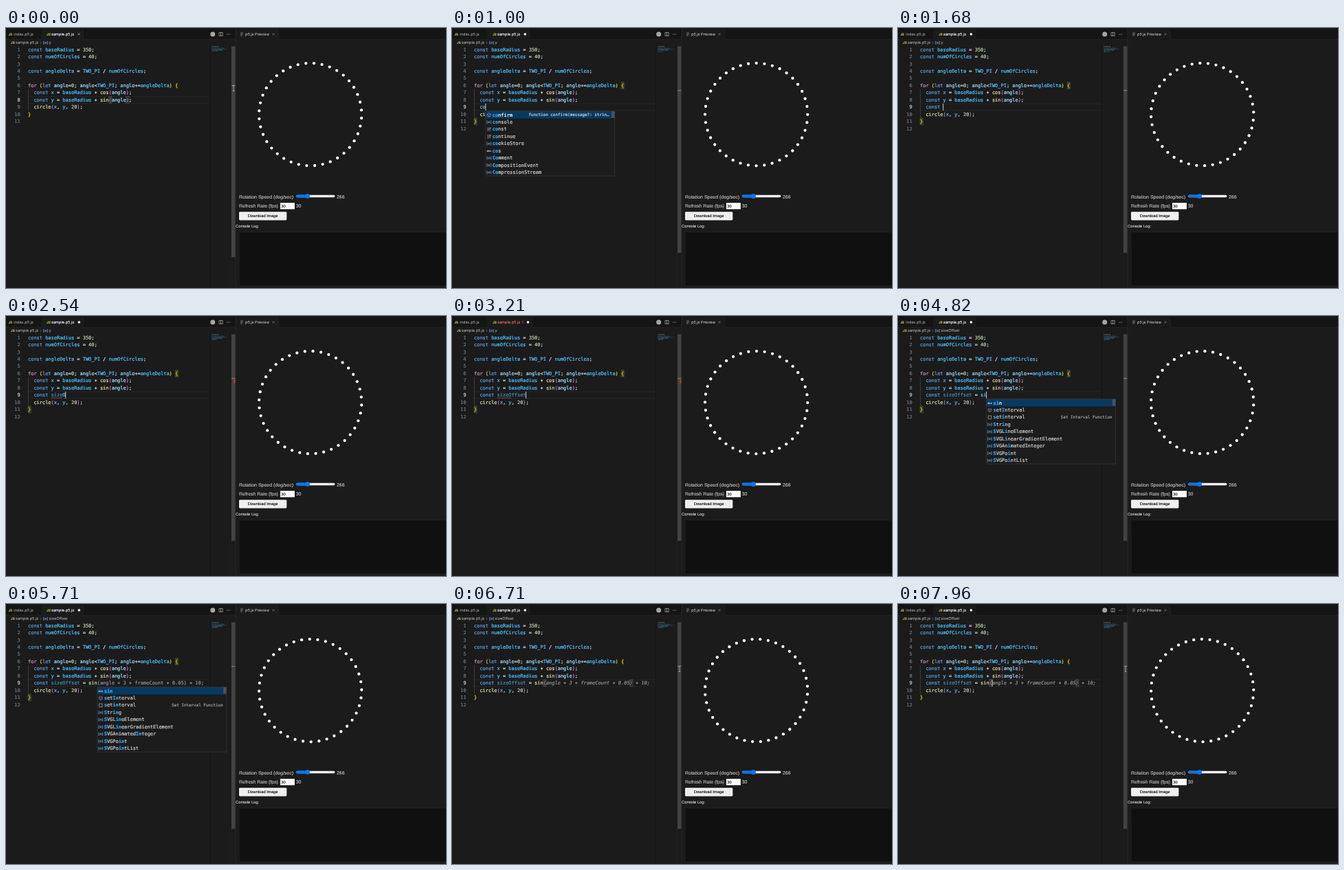
These frames come from a looping animation (640 px wide and 378 px high, 8000 ms). An HTML page with a canvas:

```html
<!DOCTYPE html>
<html lang="en">
<head>
<meta charset="utf-8">
<title>p5.js live coding</title>
<style>
  html, body { margin: 0; width: 100%; height: 100%; overflow: hidden; background: #1b1b1b; }
  canvas { display: block; width: 640px; height: 378px; }
</style>
</head>
<body>
<canvas id="stage"></canvas>
<script>
const W = 640, H = 378, LOOP = 8000;
const canvas = document.getElementById('stage');
const ctx = canvas.getContext('2d');
const dpr = window.devicePixelRatio || 1;
canvas.width = W * dpr;
canvas.height = H * dpr;

const CODE = '6.97px "DejaVu Sans Mono", monospace';
const DETAIL = '5.92px "DejaVu Sans Mono", monospace';
const UI = '5.6px Inter, sans-serif';
const CW = 4.196, LH = 10.45, LEFT = 32, TOP = 31.3;
const BG = '#1b1b1b', BAR = '#151515', BORDER = '#292929';

const HEAD = [
  'const baseRadius = 350;',
  'const numOfCircles = 40;',
  '',
  'const angleDelta = TWO_PI / numOfCircles;',
  '',
  'for (let angle=0; angle<TWO_PI; angle+=angleDelta) {',
  '  const x = baseRadius * cos(angle);',
  '  const y = baseRadius * sin(angle);'
];
const TAIL = ['  circle(x, y, 20);', '}', ''];

const ENTER = 420;
const TYPED = 'const sizeOffset = sin(';
const KEYS = [780, 900, 1080, 1200, 1320, 1480, 1700, 1820, 1980, 2260, 2500, 2640,
  2760, 2900, 3020, 3160, 3440, 4150, 4290, 4600, 4760, 4970, 5750];
const NAME_COL = 6, NAME_LEN = 10;

// Popup entries: icon letter, then label.
const C_ITEMS = ['f confirm', 'v console', 'k const', 'k continue', 'v cookieStore',
  'a cos', 'v Comment', 'v CompositionEvent', 'v CompressionStream'];
const S_ITEMS = ['a sin', 'f setInterval', 's setinterval', 'v String', 'v SVGLineElement',
  'v SVGLinearGradientElement', 'v SVGAnimatedInteger', 'v SVGPoint', 'v SVGPointList'];
const CON_ITEMS = ['k const', 'f confirm', 'v console', 'k continue', 'v ConstantSourceNode',
  'v ConvolverNode', 'v CountQueuingStrategy', 'v constructor', 'v contentEditable'];

const COLORS = {
  keyword: '#569cd6', control: '#c990c6', constant: '#4fc1ff', variable: '#9cdcfe',
  call: '#dcdcaa', number: '#b5cea8', plain: '#d4d4d4'
};

function rect(x, y, w, h, color) {
  ctx.fillStyle = color;
  ctx.fillRect(x, y, w, h);
}

function frame(x, y, w, h, color, width = 0.5) {
  ctx.strokeStyle = color;
  ctx.lineWidth = width;
  ctx.strokeRect(x, y, w, h);
}

function disc(x, y, r, color) {
  ctx.fillStyle = color;
  ctx.beginPath();
  ctx.arc(x, y, r, 0, Math.PI * 2);
  ctx.fill();
}

function pill(x, y, w, h, r, color) {
  ctx.fillStyle = color;
  ctx.beginPath();
  ctx.roundRect(x, y, w, h, r);
  ctx.fill();
}

function path(points, color, width = 0.6) {
  ctx.strokeStyle = color;
  ctx.lineWidth = width;
  ctx.beginPath();
  points.forEach(([x, y], i) => i ? ctx.lineTo(x, y) : ctx.moveTo(x, y));
  ctx.stroke();
}

// A hairline outline gives small type a slightly fuller weight.
function text(str, x, y, color, font = UI, align = 'left', weight = 0.1) {
  ctx.font = font;
  ctx.fillStyle = ctx.strokeStyle = color;
  ctx.textAlign = align;
  ctx.lineWidth = weight;
  ctx.fillText(str, x, y);
  ctx.strokeText(str, x, y);
}

function code(str, x, y, color, font = CODE, align = 'left') {
  // The operator form of the asterisk sits on the middle of the line.
  text(String(str).replaceAll('*', '∗'), x, y + 0.5, color, font, align, 0.24);
}

function cross(x, y, color) {
  const r = 1.6;
  path([[x - r, y - r], [x + r, y + r]], color);
  path([[x + r, y - r], [x - r, y + r]], color);
}

const lineY = n => TOP + (n - 1) * LH;
const colX = c => LEFT + c * CW;

function tokenColor(word) {
  if (/^(const|let)$/.test(word)) return COLORS.keyword;
  if (word === 'for') return COLORS.control;
  if (/^(cos|sin|circle|random)$/.test(word)) return COLORS.call;
  if (word === 'angle') return COLORS.variable;
  if (/^\d/.test(word)) return COLORS.number;
  if (/^[a-z_]/i.test(word)) return COLORS.constant;
  if (/[{}]/.test(word)) return '#ffd700';
  return COLORS.plain;
}

function codeLine(str, n, dim) {
  const paren = str.startsWith('  ') ? '#da70d6' : '#ffd700';
  for (const m of str.matchAll(/[A-Za-z_]\w*|\d+|[^\s]/g)) {
    const word = m[0];
    const color = /[()]/.test(word) ? paren : tokenColor(word);
    const faded = m.index === NAME_COL + 2 ? dim : 0;
    if (faded) {
      ctx.globalAlpha = 0.62;
      code(word.slice(0, faded), colX(m.index), lineY(n), color);
      ctx.globalAlpha = 1;
    }
    code(word.slice(faded), colX(m.index + faded), lineY(n), color);
  }
}

function bracketBox(col, n) {
  rect(colX(col), lineY(n) - 4.9, CW, 9.8, 'rgba(0,100,0,0.2)');
  frame(colX(col) + 0.2, lineY(n) - 4.9, CW - 0.2, 9.8, '#808080', 0.45);
}

function symbolIcon(kind, x, y) {
  const blue = '#75beff', purple = '#b180d7', grey = '#cccccc';
  if (kind === 'v') {
    path([[x - 2, y - 2], [x - 3, y - 2], [x - 3, y + 2], [x - 2, y + 2]], blue);
    path([[x + 2, y - 2], [x + 3, y - 2], [x + 3, y + 2], [x + 2, y + 2]], blue);
    frame(x - 1.2, y - 0.9, 2.4, 1.8, blue, 0.6);
  } else if (kind === 'f') {
    path([[x, y - 2.8], [x + 2.5, y - 1.4], [x + 2.5, y + 1.4], [x, y + 2.8],
      [x - 2.5, y + 1.4], [x - 2.5, y - 1.4], [x, y - 2.8]], purple);
    path([[x - 2.5, y - 1.4], [x, y], [x + 2.5, y - 1.4]], purple);
    path([[x, y], [x, y + 2.8]], purple);
  } else if (kind === 'k') {
    for (let i = -1; i < 2; i++) {
      path([[x - 2.6, y + i * 1.9], [x + (i ? 0 : 2.6), y + i * 1.9]], grey);
    }
    frame(x + 0.9, y - 2.4, 1.7, 1.2, grey);
    path([[x + 0.9, y + 1.9], [x + 2.6, y + 1.9]], grey);
  } else if (kind === 's') {
    frame(x - 2.3, y - 2.3, 4.6, 4.6, grey, 0.6);
  } else {
    text('abc', x, y, grey, '600 3.8px Inter, sans-serif', 'center');
  }
}

function matchRanges(label, prefix) {
  const low = label.toLowerCase();
  if (low.startsWith(prefix)) return [[0, prefix.length]];
  const rest = prefix.slice(1);
  const at = rest ? low.indexOf(rest, 1) : -1;
  return at > 0 ? [[0, 1], [at, at + rest.length]] : [[0, 1]];
}

function popup(x, items, prefix) {
  const y = 121, w = 188, h = 9 * LH;
  rect(x, y, w, h, '#1c1c1c');
  rect(x, y, w, LH, '#073a62');
  items.forEach((item, i) => {
    const label = item.slice(2), cy = y + (i + 0.5) * LH;
    symbolIcon(item[0], x + 5, cy + 0.2);
    const hot = matchRanges(label, prefix);
    [...label].forEach((ch, k) => {
      const on = hot.some(([a, b]) => k >= a && k < b);
      const color = on ? '#2aaaff' : i ? '#cccccc' : '#ffffff';
      code(ch, x + 10 + k * CW, cy, color, on ? 'bold ' + CODE : CODE);
    });
    if (label === 'confirm' && i === 0) {
      code('function confirm(message?: strin…', x + 62.5, cy, '#c4cdd5', DETAIL);
    }
    if (label === 'setinterval') {
      code('Set Interval Function', x + 183, cy, '#999999', DETAIL, 'right');
    }
  });
  rect(x + w - 4.6, y, 4.2, 9.5, '#4d5358');
  frame(x, y, w, h, '#454545', 0.5);
}

function ghostText(t, count) {
  const random = '= random(-10, 10);', wave = '(angle * 3 + frameCount * 0.05) * 10;';
  if (t > 3600 && count >= 17 && count <= 19) return random.slice(count - 17);
  if (t > 5200 && count >= 22) return wave.slice(count - 22);
  return '';
}

function tabs(t, dirty, failed) {
  rect(0, 0, 334, 16.5, BAR);
  rect(0, 16, 334, 0.5, BORDER);
  const right = failed ? 116 : 112;
  rect(52, 1.3, right - 52, 15.3, BG);
  rect(51.7, 1.3, 0.5, 15, BORDER);
  rect(right, 1.3, 0.5, 15, BORDER);
  const js = 'bold 4.6px Inter, sans-serif';
  text('JS', 3.4, 9.2, '#cbcb41', js);
  text('index.p5.js', 11.3, 9, '#9d9d9d');
  text('JS', 59, 9.2, '#cbcb41', js);
  text('sample.p5.js', 66, 9, failed ? '#f56c62' : '#ffffff');
  if (failed) text('1', 101.5, 9, '#c45048');
  if (dirty) disc(failed ? 110.5 : 106.3, 9, 1.8, '#ffffff');
  else cross(106, 9, '#d0d0d0');

  disc(300.7, 9, 3.5, '#a8a8a8');
  frame(310, 6.5, 5.2, 5, '#cccccc', 0.6);
  path([[312.6, 6.5], [312.6, 11.5]], '#cccccc');
  for (let i = 0; i < 3; i++) disc(321.4 + i * 2.1, 9, 0.5, '#cccccc');

  text('JS', 7, 21.6, '#cbcb41', js);
  text('sample.p5.js', 14, 21.5, '#a4a4a4');
  path([[49.8, 19.8], [51.4, 21.5], [49.8, 23.2]], '#9d9d9d', 0.5);
  symbolIcon('v', 57.5, 21.5);
  text(t > 4650 ? 'sizeOffset' : 'y', 62.6, 21.5, '#a4a4a4');
}

function minimap(lines) {
  ctx.globalAlpha = 0.5;
  lines.forEach((str, i) => {
    for (const m of str.matchAll(/\S+/g)) {
      rect(299 + m.index * 0.43, 26.3 + i * 0.87, m[0].length * 0.43, 0.55, tokenColor(m[0]));
    }
  });
  ctx.globalAlpha = 1;
}

function squiggle(x, y, length) {
  const points = [], step = 0.9;
  for (let i = 0; i * step <= length; i++) {
    points.push([x + i * step, y + (i % 2 ? 0.5 : -0.5)]);
  }
  path(points, '#f14c4c', 0.6);
}

function editor(t) {
  const entered = t >= ENTER;
  const count = KEYS.filter(k => k <= t).length;
  const typed = TYPED.slice(0, count);
  const failed = t >= 2900 && t < 4700;
  const marked = t >= 2260 && t < 4700;
  const row = entered ? 9 : 8;
  const lines = [...HEAD, ...(entered ? ['  ' + typed] : []), ...TAIL];
  const nameLen = Math.max(0, Math.min(count - NAME_COL, NAME_LEN));
  const dim = nameLen === NAME_LEN ? NAME_LEN : Math.max(0, nameLen - 1);
  const ghost = ghostText(t, count);
  const inC = count >= 1 && count <= 5;
  const inS = count >= 20 && count <= 22;
  const called = count === TYPED.length;

  rect(0, 0, 334, H, BG);
  tabs(t, entered, failed);

  rect(LEFT - 1, lineY(row) - 5.2, 296 - LEFT, 0.7, '#292929');
  rect(LEFT - 1, lineY(row) + 4.6, 296 - LEFT, 0.7, '#292929');
  rect(LEFT + 0.2, lineY(7) - LH / 2, 0.5, (entered ? 4 : 3) * LH, '#5a5a5a');

  if (!entered) {
    bracketBox(28, 8);
    bracketBox(34, 8);
  } else if (called) {
    bracketBox(24, 9);
    bracketBox(54, 9);
  } else {
    bracketBox(51, 6);
    bracketBox(0, 11);
  }

  lines.forEach((str, i) => {
    const n = i + 1;
    code(n, 20.6, lineY(n), n === row ? '#cccccc' : '#6e7681', CODE, 'right');
    codeLine(str, n, entered && n === 9 ? dim : 0);
  });

  const caretX = colX(2 + count);
  if (ghost) {
    const close = called ? ghost.indexOf(')') : -1;
    const font = inS ? CODE : 'italic ' + CODE;
    [...ghost].forEach((ch, i) => {
      code(ch, caretX + i * CW, lineY(9), i === close ? '#a86aa6' : '#8f8f8f', font);
    });
  }

  if (marked && dim) squiggle(colX(NAME_COL + 2), lineY(9) + 4.2, Math.min(5, dim) * CW);

  const lastKey = KEYS.filter(k => k <= t).pop() || ENTER;
  if (entered && (t - lastKey) % 1000 < 500) rect(caretX - 0.3, lineY(9) - 5, 0.9, 10, '#e0e0e0');

  rect(296, 25, 0.6, H - 25, '#141414');
  minimap(lines);
  rect(327.6, 25, 0.5, H - 25, '#242424');
  rect(328, 26.5, 5.6, entered ? 300.5 : 306.5, '#434343');
  rect(328, entered ? 90.3 : 83.5, 5.6, 0.9, '#8a8a8a');
  if (marked) rect(331.4, 92, 2.2, 6, '#c4392f');

  if (inC) popup(caretX, count < 3 ? C_ITEMS : CON_ITEMS, typed);
  if (inS) popup(caretX, S_ITEMS, typed.slice(19));
}

function preview(t) {
  rect(334, 0, 306, H, BG);
  rect(334, 0, 306, 16.5, BAR);
  rect(334, 1.3, 62, 15.3, BG);
  rect(396, 1.3, 0.5, 15, BORDER);
  rect(396, 16, 244, 0.5, BORDER);
  rect(333.7, 0, 0.7, H, '#2b2b2b');
  for (let i = -1; i < 2; i++) {
    path([[341, 9 + i * 1.9], [i === 1 ? 344 : 345, 9 + i * 1.9]], '#b0b0b0');
  }
  text('p5.js Preview', 348, 9, '#b8b8b8');
  cross(389, 9, '#8c8c8c');

  // The sketch redraws at 30 fps, so 266 deg/sec appears as a slow backward drift.
  const seconds = Math.floor(t * 30 / 1000) / 30;
  for (let i = 0; i < 40; i++) {
    const a = (4.07 + 266 * seconds + i * 9 - 90) * Math.PI / 180;
    disc(442.65 + 74.6 * Math.cos(a), 125.7 + 74.6 * Math.sin(a), 2.15, '#ffffff');
  }

  const sans = size => size + 'px "Liberation Sans", Arial, sans-serif';
  const body = sans(6.97), small = sans(5.8);
  text('Rotation Speed (deg/sec)', 339, 245.8, '#cccccc', body);
  pill(421.9, 242.7, 56.5, 3.5, 1.75, '#efefef');
  pill(421.9, 242.7, 17, 3.5, 1.75, '#0075ff');
  disc(438.4, 244.4, 3.5, '#0075ff');
  text('266', 480.9, 245.8, '#cccccc', body);
  text('Refresh Rate (fps)', 339, 258.6, '#cccccc', body);
  rect(398.9, 254.2, 21, 9.2, '#ffffff');
  text('30', 400.3, 259, '#000000', small);
  text('30', 421.7, 258.6, '#cccccc', body);
  pill(339, 267.2, 69.3, 12.2, 1.3, '#efefef');
  text('Download Image', 373.6, 273.4, '#000000', small, 'center');
  text('Console Log:', 334, 288.3, '#e0e0e0', small);
  rect(339, 296.3, 301, 78.7, '#101010');
  frame(339.2, 296.5, 302, 78.2, '#2d2d2d', 0.5);
}

function pointer(t) {
  if (t >= ENTER && t < 6100) return;
  const x = 331, y = t < ENTER ? 87.5 : 94.3;
  for (const [color, width] of [['#202020', 1.7], ['#d8d8d8', 0.8]]) {
    path([[x, y - 4], [x, y + 4]], color, width);
    path([[x - 1.8, y - 4.4], [x, y - 3.8], [x + 1.8, y - 4.4]], color, width);
    path([[x - 1.4, y + 4.4], [x, y + 3.8], [x + 1.4, y + 4.4]], color, width);
  }
}

function draw(now) {
  const t = now % LOOP;
  ctx.setTransform(dpr, 0, 0, dpr, 0, 0);
  ctx.textBaseline = 'middle';
  ctx.textRendering = 'geometricPrecision';
  ctx.lineJoin = 'round';
  editor(t);
  preview(t);
  pointer(t);
}

const start = performance.now();
function tick() {
  draw(performance.now() - start);
  requestAnimationFrame(tick);
}
tick();
</script>
</body>
</html>
```
